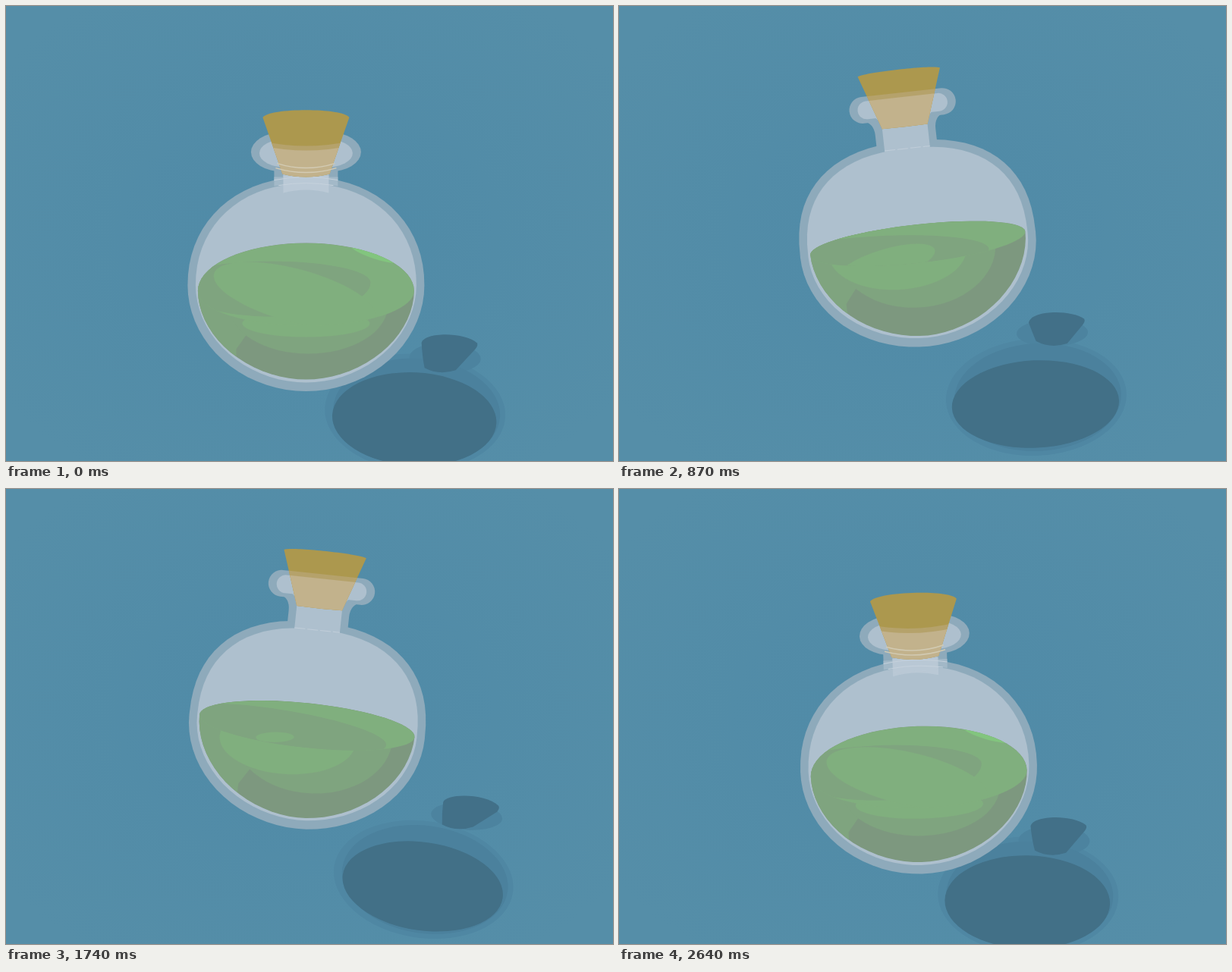
Recreate the animation shown at these times as an HTML page. Size 800 by 600 pixels, loop 2700 ms.

```html
<!DOCTYPE html>
<html lang="en">
<head>
<meta charset="utf-8">
<title>Potion bottle</title>
<style>
  html, body { margin: 0; width: 100%; height: 100%; overflow: hidden; background: #538ca8; }
  svg { display: block; width: 100vw; height: 100vh; }
</style>
</head>
<body>
<svg viewBox="0 0 800 600">
  <defs>
    <radialGradient id="bg" gradientUnits="userSpaceOnUse" cx="400" cy="300" r="500"
      gradientTransform="translate(0 75) scale(1 .75)">
      <stop offset="0" stop-color="#4f8aa7"/>
      <stop offset="1" stop-color="#558ea8"/>
    </radialGradient>
    <clipPath id="inLiquid"><path id="liquidClip"/></clipPath>
    <clipPath id="inDisc"><path id="discClip"/></clipPath>
    <clipPath id="inCork"><path id="corkClip"/></clipPath>
  </defs>
  <rect width="800" height="600" fill="url(#bg)"/>

  <g id="shade">
    <ellipse id="shadeGlass" fill="#4f87a3"/>
    <ellipse id="shadeRim" fill="#4c839f"/>
    <ellipse id="shadeInner" fill="#4b819d"/>
    <path id="shadeCork" fill="#427088"/>
    <ellipse id="shadeLiquid" fill="#427087"/>
  </g>

  <g id="bottle">
    <g fill="#8eaabb">
      <path id="neckOut"/><rect id="rimOut"/><path id="bodyOut"/>
    </g>
    <g fill="#aec0ce">
      <path id="neckIn"/><rect id="rimIn"/><path id="bodyIn"/>
    </g>
    <g id="joint">
      <path fill="#a3b9c8" d="M-42-141H42V-129Q0-135-42-129Z"/>
      <path fill="#bac9d6" d="M-30-143H30V-120Q0-128-30-120Z"/>
      <path fill="none" stroke="#c6d2dd" d="M-42-137Q0-145 42-137M-36-130Q0-136 36-130"/>
    </g>
    <path id="seam" fill="none" stroke="#c0cdd9" stroke-dasharray="14 3" d="M-30-126H30"/>

    <path id="cork" fill="#ac984e"/>
    <g clip-path="url(#inCork)">
      <path id="corkBand" fill="#b5a26b"/>
      <path id="corkIn" fill="#c2b28c"/>
    </g>
    <path id="rimLines" fill="none" stroke="#d3cbb4" stroke-width="1.5"
      d="M-38-159Q0-147 38-159M-40-153Q0-141 40-153"/>

    <path id="liquid" fill="#7d987f"/>
    <g clip-path="url(#inLiquid)">
      <path id="side" fill="#7fa47f"/>
      <ellipse id="bowl" fill="#7fa47f"/>
      <ellipse id="strip" fill="#80af7e"/>
      <path id="disc" fill="#80af7e"/>
      <g clip-path="url(#inDisc)">
        <path id="swirl" fill="#7fa47f"/>
        <ellipse id="glow" fill="#80af7e"/>
      </g>
      <ellipse id="shine" fill="#82c57e"/>
    </g>
  </g>
</svg>
<script>
const LOOP = 2700, STEP = 30;
const el = id => document.getElementById(id);
const set = (id, attrs) => { for (const k in attrs) el(id).setAttribute(k, attrs[k]); };
const path = (id, d) => set(id, { d });
const mix = (a, b, k) => a + (b - a) * k;

function ellipse(id, cx, cy, rx, ry, turn = 0) {
  set(id, { cx, cy, rx, ry, transform: `rotate(${turn} ${cx} ${cy})` });
}

// Closed oval with its own height and roundness above and below the waist.
function oval(cx, cy, rx, up, down, nUp = 2, nDown = 2) {
  const pts = [];
  for (let i = 0; i < 72; i++) {
    const a = i * Math.PI / 36, c = Math.cos(a), s = Math.sin(a);
    const e = 2 / (s < 0 ? nUp : nDown);
    const x = cx + rx * Math.sign(c) * Math.abs(c) ** e;
    const y = cy + (s < 0 ? -up : down) * Math.abs(s) ** e;
    pts.push(x.toFixed(2) + ' ' + y.toFixed(2));
  }
  return 'M' + pts.join('L') + 'Z';
}

function pill(id, half, top, bottom, extra) {
  const h = bottom - top;
  set(id, { x: -half, y: top, width: 2 * half, height: h, rx: h / 2 + extra, ry: h / 2 });
}

// q: how far the liquid tips towards the viewer, r: roll from -1 to 1.
function drawLiquid(q, r) {
  const rx = 142.5, cy = 0.5 + 8.5 * q, back = 28 + 35 * q, front = 28 + 18 * q;
  const shape = oval(0, cy, rx, back, 122 - 5 * q, 2, 1.91);
  const disc = oval(0, cy, rx, back, front);
  for (const id of ['liquid', 'liquidClip']) path(id, shape);
  for (const id of ['disc', 'discClip']) path(id, disc);

  path('side', `M-150-30H-40L${-75 + 8 * r} ${54 + 8 * q + 8 * r}L${-92 + 10 * r} ${78 + 8 * q + 8 * r}V110H-150Z`);
  ellipse('bowl', 3 + 6 * r, mix(10, 28, q) + 2 * r, 105, mix(77, 64, q), -3 * r);
  ellipse('strip', mix(-25, 0, q), mix(16, 52, q) + 4 * r, mix(90, 84, q), mix(47, 18, q), -3 * r);
  path('swirl', oval(-45 + 8 * r, mix(11, -2, q), mix(145, 130, q), mix(25, 28, q), mix(25, 45, q)));
  set('swirl', { transform: `rotate(${3 * (1 - q)})` });
  ellipse('glow', mix(-42, -15, q), mix(7 + 14 * r * r, 15, q),
    mix(45 - 25 * r, 110, q), mix(13 - 8 * r, 35, q), mix(-8, 15, q));
  ellipse('shine', 92, -40, 34, 7, 18);
}

function drawGlass(q, n) {
  const round = 2.38 - 0.25 * q;
  path('bodyOut', oval(0, 2, 156, 138 + 5 * q, 135 + 4.5 * q, round, 1.97));
  path('bodyIn', oval(0, 2, 145.5, 128.5 + 6 * q, 123.5 + 4.5 * q, round, 1.95));
  pill('rimOut', 70.5 + 2 * n, -200, -165 + 17 * n, 16 * n);
  pill('rimIn', 59.5 + 2 * n, -194 + 3 * n, -170 + 16 * n, 16 * n);
  const w = 40 + 2 * n;
  path('neckOut', `M-54-168Q${-w}-164 ${-w}-148V-125H${w}V-148Q${w}-164 54-168Z`);
  path('neckIn', 'M-44-175Q-30-168-30-154V-120H30V-154Q30-168 44-175Z');
  set('joint', { opacity: n });
  set('seam', { opacity: 1 - n });
}

function drawCork(n) {
  const top = -227 + 7.5 * n, half = 54.5 + 2.5 * n, rise = top - 5 - 8 * n;
  const low = -155 + 10 * n, foot = 30 + n;
  const cork = `M${-half} ${top}C${8 - half} ${rise} ${half - 8} ${rise} ${half} ${top}` +
    `L${foot} ${low}Q0 ${low + 1 + 7 * n} ${-foot} ${low}Z`;
  const below = y => `M-60 ${y}Q0 ${y + 14 * n} 60 ${y}V-130H-60Z`;
  const lip = -200 + 11 * n;
  path('cork', cork);
  path('corkClip', cork);
  path('corkBand', below(lip));
  path('corkIn', below(lip + 6));
  set('rimLines', { opacity: n * n, transform: `translate(0 ${12 * (n - 1)})` });
}

function drawShade(y, roll, q, n) {
  const x = 538.3 + 0.2 * (366 - y), sy = 546.5 + 0.41 * (y - 366) - 2 * q;
  const turn = 3 + 0.9 * roll;
  ellipse('shadeGlass', x + 1, sy - 9, 119, 77, turn);
  ellipse('shadeInner', x + 3, sy - 9, 110, 71, turn);
  ellipse('shadeLiquid', x, sy, 108.3 - 0.3 * roll, 58 + 3.5 * q, turn);

  const cx = x + 46.5 + 2.9 * roll, top = sy - 120 + 8.5 * q, h = 44 + 6 * n;
  ellipse('shadeRim', cx - 6, top + 27 + 4 * n, 47, 18 + 2 * n, turn / 2);
  const lean = -0.9 * roll, dy = 0.4 * roll;
  const P = (px, py) => `${cx + px} ${top + py}`;
  path('shadeCork', `M${P(-37, 11 - dy)}C${P(-34, -3)} ${P(18, -4)} ${P(36, 11 + dy)}` +
    `Q${P(38, 14 + dy)} ${P(34, 19 + dy)}L${P(8 + lean, h - 3)}` +
    `Q${P(-14 + lean, h + 4)} ${P(-33 + lean, h - 6)}Q${P(-36 + lean / 2, h - 20)} ${P(-37, 11 - dy)}Z`);
}

function draw(t) {
  const w = 2 * Math.PI * t / LOOP;
  const c = k => Math.cos(k * w), s = k => Math.sin(k * w);
  const roll = -2.1 * s(1) + 5.2 * s(2) + 1.7 * s(3);
  const y = 328.9 + 31.6 * c(1) + 4.2 * c(2) + 1.9 * c(3) - 1.5 * s(1);
  const x = 395.4 + 0.25 * roll;
  const q = Math.max(-0.1, 0.28 + 0.14 * c(1) + 0.58 * c(2));
  const n = Math.max(0, 0.25 + 0.25 * c(1) + 0.5 * c(2));
  set('bottle', { transform: `translate(${x} ${y}) rotate(${roll})` });
  set('shine', { visibility: n > 0.85 ? 'visible' : 'hidden' });
  drawGlass(q, n);
  drawCork(n);
  drawLiquid(q, roll / 6.1);
  drawShade(y, roll, q, n);
}

function tick() {
  const t = performance.now() % LOOP;
  draw(Math.min(LOOP - 2 * STEP, Math.floor(t / STEP) * STEP));
  requestAnimationFrame(tick);
}
tick();
</script>
</body>
</html>
```
